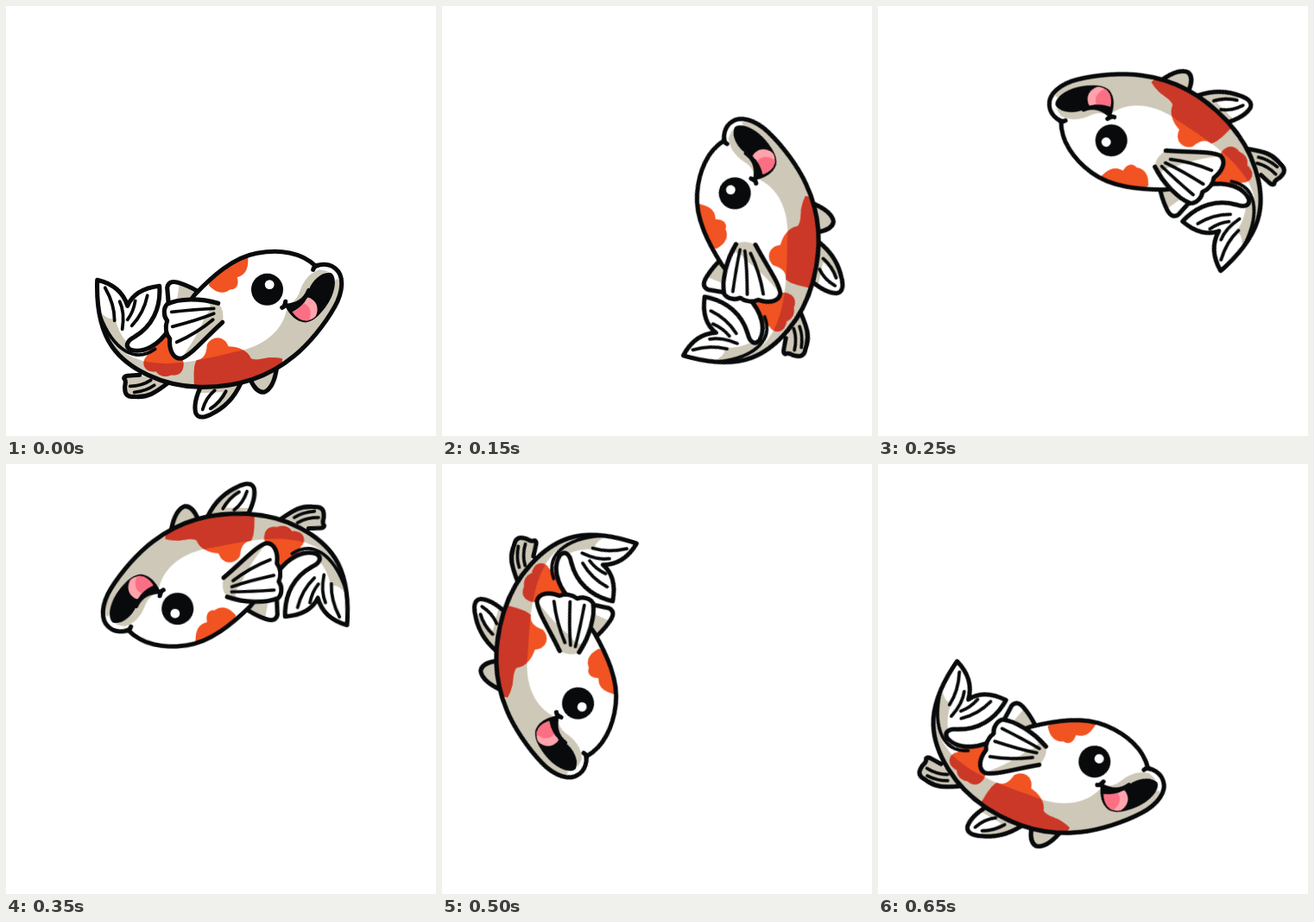
Recreate the animation shown at these times as an HTML page without scripts. Size 498 by 498 pixels, loop 700 ms.

```html
<!DOCTYPE html>
<html lang="en">
<head>
<meta charset="utf-8">
<title>Circling koi</title>
<style>
  html, body { margin: 0; width: 100%; height: 100%; overflow: hidden; background: #fff; }
  svg { display: block; width: 100vw; height: 100vh; }
  .koi {
    transform-origin: 249px 249px;
    animation: circle .7s step-end infinite;
  }
  @keyframes circle {
    0% { transform: rotate(0deg); }
    7.14% { transform: rotate(-25.2deg); }
    14.28% { transform: rotate(-50.4deg); }
    21.42% { transform: rotate(-75.6deg); }
    28.57% { transform: rotate(-104.5deg); }
    35.71% { transform: rotate(-133.2deg); }
    42.85% { transform: rotate(-156deg); }
    49.99% { transform: rotate(-177.7deg); }
    57.14% { transform: rotate(-202.1deg); }
    64.28% { transform: rotate(-226.5deg); }
    71.42% { transform: rotate(-253.1deg); }
    78.57% { transform: rotate(-279.7deg); }
    85.71% { transform: rotate(-303.5deg); }
    92.85%, 100% { transform: rotate(-327.1deg); }
  }
  .line { fill: none; stroke: #080a0b; stroke-width: 5.1; stroke-linecap: round; stroke-linejoin: round; }
  .rib { stroke-width: 3.8; }
  .white { fill: #fff; }
  .shade { fill: #cec8b8; }
  .orange { fill: #f15322; }
  .red { fill: #cb3827; }
  .ink { fill: #080a0b; }
</style>
</head>
<body>
<svg viewBox="0 0 498 498">
  <defs>
    <path id="body" d="M360 301C344 285 318 281 292 286C264 291 240 313 220 334L190 374C178 393 160 402 146 398C138 394 142 387 150 383C170 371 181 350 179 324C162 326 148 333 142 347C137 331 124 321 107 317C106 345 109 372 124 394C142 420 182 440 225 441C270 442 305 430 335 405C352 391 371 368 382 348C392 330 393 312 383 304C377 298 367 298 360 301Z"/>
    <path id="belly" d="M116 378C130 400 152 412 175 413C205 416 238 407 268 400C300 394 324 375 327 347L350 365L384 316L410 320L380 450H100Z"/>
    <path id="patches" d="M236 323C247 335 256 332 261 328C270 328 271 320 269 314C281 310 283 302 281 280H255ZM219 450C220 434 217 419 222 410C230 409 234 402 234 392C240 381 254 381 259 394C269 394 281 398 285 408C294 412 301 404 321 408L325 450ZM196 372C203 384 202 398 206 409C209 420 204 429 193 427C184 431 178 427 175 423C164 424 158 417 162 408C168 403 165 396 170 389Z"/>
    <clipPath id="inBody"><use href="#body"/></clipPath>
    <clipPath id="inPatches"><use href="#patches"/></clipPath>
  </defs>

  <g class="koi"><g transform="translate(-1.3 .3)">
    <!-- far fins -->
    <path class="shade" d="M190 350L188 326C189 318 196 318 204 321Q216 325 228 333L215 350Z"/>
    <path class="white" d="M191 344L189 326Q192 318 202 321L199 343Z"/>
    <path class="line" d="M190 350L188 326C189 318 196 318 204 321Q216 325 228 333"/>

    <path class="shade line" style="fill:#cec8b8" d="M156 427C146 428 138 427 138 431C142 435 138 438 139 443C139 450 143 453 149 452C165 454 175 447 188 437"/>
    <path class="line rib" d="M145 440Q158 440 169 433M150 447Q163 446 173 439"/>

    <path class="shade" d="M228 438C222 450 219 463 221 471C224 478 231 476 238 473C253 466 265 455 273 437Z"/>
    <path class="white" d="M225 448L221 470Q226 479 238 471L252 447Z"/>
    <path class="line" d="M228 438C222 450 219 463 221 471C224 478 231 476 238 473C253 466 265 455 273 437"/>
    <path class="line rib" d="M229 467Q233 453 243 445M238 466Q250 458 256 446"/>

    <path class="line" style="fill:#cec8b8" d="M285 434C289 442 293 447 300 447C308 444 313 432 315 418"/>

    <!-- body -->
    <use href="#body" class="white"/>
    <g clip-path="url(#inBody)">
      <use href="#belly" class="shade"/>
      <path class="shade" d="M109 352C117 378 132 400 148 404L142 390Q131 378 128 362Q118 364 109 352ZM160 402L190 364L205 390Q185 392 172 402Z"/>
      <use href="#patches" class="orange"/>
      <g clip-path="url(#inPatches)"><use href="#belly" class="red"/></g>
    </g>
    <use href="#body" class="line"/>
    <path class="line rib" d="M174 397C152 413 126 400 110 358"/>
    <path class="line rib" d="M116 326Q127 345 127 364M133 342Q139 354 136 374M165 335Q161 355 147 370M151 341Q149 354 142 363"/>

    <!-- face -->
    <path class="shade" d="M364 305C350 310 344 322 341 332Q337 342 326 347C345 346 352 335 355 327Q360 312 375 307Z"/>
    <path class="ink" d="M325 348C340 346 348 340 352 329C356 316 370 306 378 309C386 315 382 335 371 349C364 358 356 367 346 366C338 365 330 358 325 348Z"/>
    <path fill="#ffa3ad" d="M333 354C341 350 347 345 350 337C360 339 365 349 360 359C352 367 341 365 333 354Z"/>
    <path fill="#fb6f84" d="M333 354Q341 350 346 344C354 347 356 356 352 364Q341 366 333 354Z"/>
    <path class="line" d="M325 347C340 346 348 340 352 329M321 349Q324 348 325 342M362 300Q358 301 357 305"/>
    <circle class="ink" cx="303.8" cy="328" r="18.5"/>
    <circle class="white" cx="306.5" cy="322.3" r="5.4"/>

    <!-- near fin -->
    <path class="white" d="M247 344C226 338 202 338 188 345C183 350 184 360 188 364C185 372 187 380 191 385C190 397 194 408 204 408C216 404 230 386 252 366Z"/>
    <path class="shade" d="M247 344L236 343Q241 351 232 358Q226 378 204 408C216 404 230 386 252 366Q255 352 247 344Z"/>
    <path class="line" d="M247 344C226 338 202 338 188 345C183 350 184 360 188 364C185 372 187 380 191 385C190 397 194 408 204 408C216 404 230 386 252 366"/>
    <path class="line rib" d="M193 354Q220 351 242 350M194 371Q222 364 242 356M199 389Q222 379 241 363"/>
  </g></g>
</svg>
</body>
</html>
```
